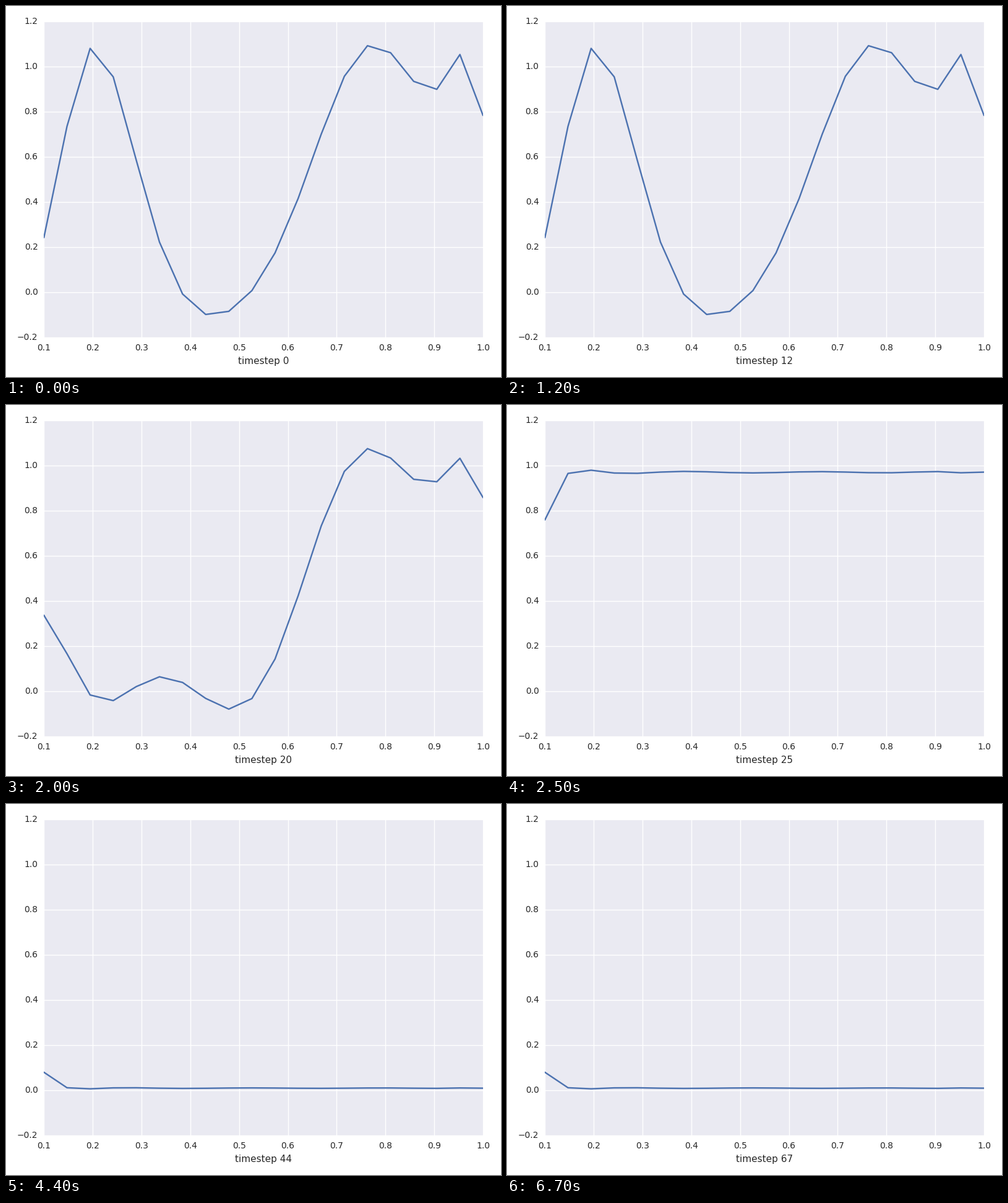
Recreate the animation shown at these times as a matplotlib script. Size 800x600 px, loop 6800 ms.

```python
import numpy as np
import matplotlib.pyplot as plt
from matplotlib.animation import FuncAnimation
from numpy.polynomial import Polynomial

FRAMES, INTERVAL = 68, 100
W, H, DPI = 800, 600, 100
LEFT, BOTTOM, WIDTH, HEIGHT = 61.25, 64.2, 709.7, 511
INK = "#262626"
DEGREE = 9

plt.rcParams.update({"font.family": "DejaVu Sans", "font.size": 10})

x = np.linspace(0.1, 1.0, 20)
knots = x[[0, 1, 3, 5, 8, 11, 14, 16, 18, 19]]


def fit(px, py):
    """Least-squares polynomial through the points, sampled on x."""
    return Polynomial.fit(px, py, DEGREE)(x)


# Flat profiles ripple because of their off-level first sample
full = fit(x, np.where(x > x[0], 0.97, 0.758))
rest = (0.997 - full) / 3
bump = fit(knots, [-0.015, 0.58, 1.006, 0.167, 0.004,
                   0.001, 0.027, 0.004, 0.031, -0.066])
pair = fit(knots, [0.242, 0.735, 0.954, 0.222, -0.085,
                   0.415, 1.092, 0.934, 1.053, 0.783])
tail = pair - bump + rest

# Each curve holds from its first step until the next one starts
SCHEDULE = [
    (0, pair), (4, tail), (6, full), (10, pair), (13, bump), (19, tail),
    (24, full), (29, bump), (32, rest), (58, tail), (62, rest),
]


def curve_at(step):
    return [curve for start, curve in SCHEDULE if start <= step][-1]


fig = plt.figure(figsize=(W / DPI, H / DPI), dpi=DPI, facecolor="white")
ax = fig.add_axes([LEFT / W, BOTTOM / H, WIDTH / W, HEIGHT / H],
                  facecolor="#EAEAF2")
ax.set(xlim=(0.1, 1.0), ylim=(-0.2, 1.2),
       xticks=np.arange(1, 11) / 10, yticks=np.arange(-2, 13, 2) / 10)
ax.xaxis.set_major_formatter("{x:.1f}")
ax.yaxis.set_major_formatter("{x:.1f}")
ax.tick_params(length=0, labelcolor=INK, labelsize=10)
ax.tick_params(axis="x", pad=7.5)
ax.tick_params(axis="y", pad=7)
plt.setp(ax.get_yticklabels(), va="center")
ax.grid(True, color="white", lw=1, ls="-")
ax.set_axisbelow(True)
ax.spines[:].set_visible(False)

line, = ax.plot(x, pair, color="#4C72B0", lw=1.75, solid_capstyle="round")
label = fig.text(416 / W, 21 / H, "", size=11, color=INK,
                 ha="center", va="baseline")


def update(step):
    line.set_ydata(curve_at(step))
    label.set_text(f"timestep {step}")
    return line, label


anim = FuncAnimation(fig, update, frames=FRAMES, interval=INTERVAL,
                     repeat=True, repeat_delay=0, blit=False)
plt.show()
```
